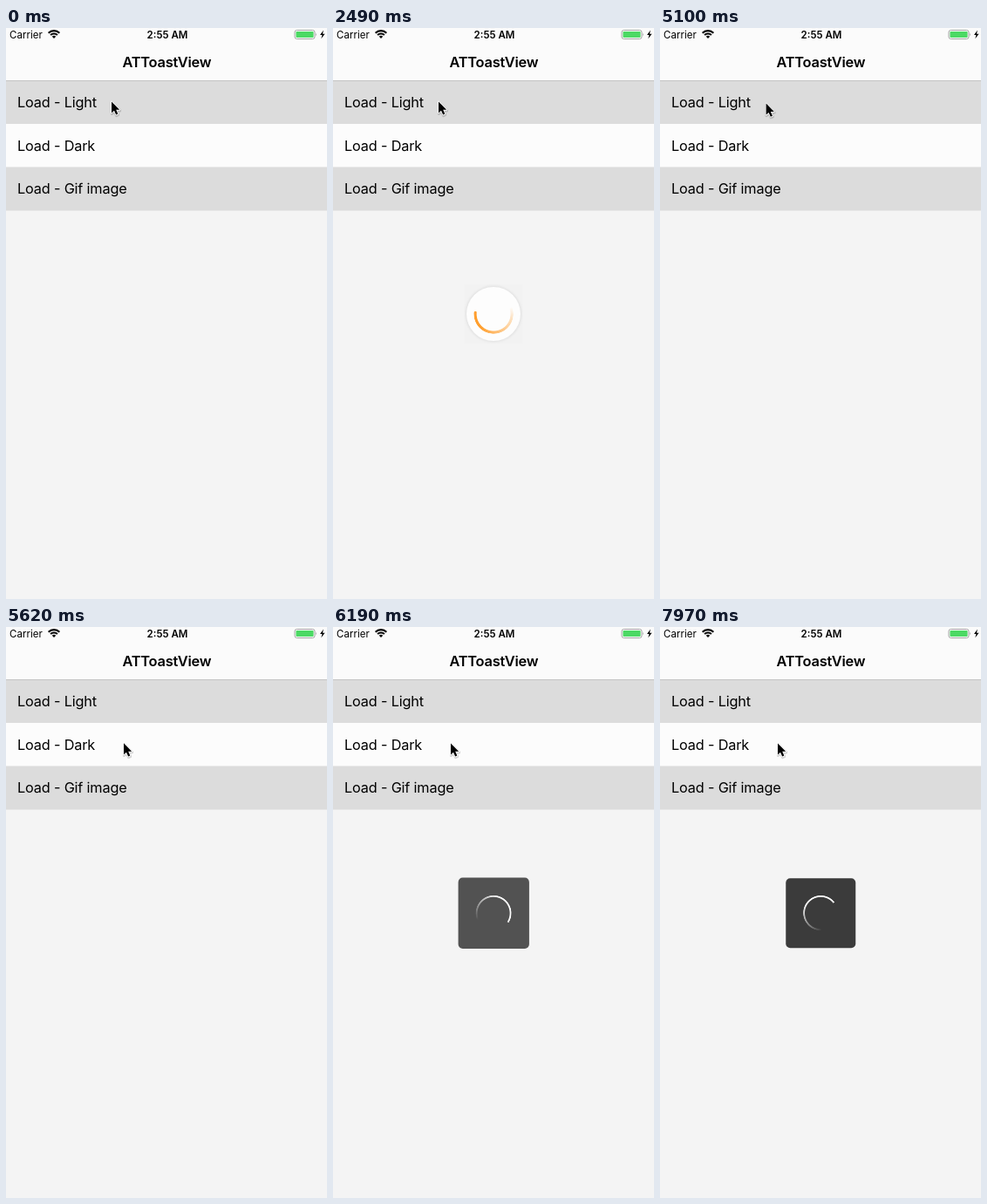
Animation, 368 px wide and 655 px high, one loop 8000 ms. Source, as an HTML page:

```html
<!DOCTYPE html>
<html lang="en">
<head>
<meta charset="utf-8">
<title>Toast demo</title>
<style>
  html, body { margin: 0; width: 100%; height: 100%; overflow: hidden; background: #f4f4f4; }
  svg { position: absolute; left: 0; top: 0; }
  text { font-family: Inter, "Liberation Sans", sans-serif; fill: #000; }
  .row { font-size: 16.3px; letter-spacing: -.18px; }
  .title { font-size: 16.4px; font-weight: 600; letter-spacing: -.25px; }
  .status { font-size: 11.5px; }

  .toast { position: absolute; left: 184px; top: 328px; width: 0; height: 0; opacity: 0; }
  .toast div { position: absolute; transform: translate(-50%, -50%); }
  .halo { width: 67px; height: 67px; background: #f2f2f2; }
  .disc { width: 62px; height: 62px; border-radius: 50%; background: #fdfdfd;
          box-shadow: 0 0 3px 1px rgba(0, 0, 0, .08); }
  .plate { width: 79.5px; height: 79.5px; border-radius: 5px; background: #3b3b3b; }

  .toast .ring {
    --band: radial-gradient(circle closest-side,
      transparent calc(100% - var(--w) - .6px), #000 calc(100% - var(--w) + .3px),
      #000 calc(100% - .8px), transparent 100%);
    width: calc(2 * var(--r)); height: calc(2 * var(--r));
    border-radius: 50%;
    -webkit-mask: var(--band); mask: var(--band);
  }
  .ring::after {
    content: ""; position: absolute; left: calc(100% - var(--w) - .3px); top: calc(50% - var(--w) / 2);
    width: var(--w); height: var(--w); border-radius: 50%; background: var(--ink);
  }
  .light .ring {
    --r: 23.1px; --w: 3.4px; --ink: #ff9f2f;
    background: conic-gradient(from 90deg, transparent 155deg, rgba(255, 159, 47, .25) 185deg, #ff9f2f 310deg);
  }
  .dark .ring {
    --r: 20.3px; --w: 2.1px; --ink: #fff;
    background: conic-gradient(from 90deg, transparent 125deg, #fff 250deg);
  }
</style>
</head>
<body>
<svg width="368" height="655" viewBox="0 0 368 655">
  <rect width="368" height="655" fill="#f4f4f4"/>
  <rect width="368" height="60" fill="#fbfbfb"/>
  <rect y="60" width="368" height="1" fill="#c4c4c4"/>
  <rect y="61" width="368" height="49" fill="#dcdcdc"/>
  <rect y="110" width="368" height="50" fill="#fcfcfc"/>
  <rect y="159.5" width="368" height="50" fill="#dcdcdc"/>

  <text class="status" x="4.1" y="11.6">Carrier</text>
  <text class="status" x="185" y="11.6" text-anchor="middle" font-weight="600">2:55 AM</text>
  <g transform="translate(55 12)" fill="none" stroke="#000" stroke-width="2.1">
    <path d="M-6.3 -6.3A8.9 8.9 0 0 1 6.3 -6.3"/>
    <path d="M-3.9 -3.9A5.5 5.5 0 0 1 3.9 -3.9"/>
    <path d="M0 0L-2.2 -2.2A3.1 3.1 0 0 1 2.2 -2.2Z" fill="#000" stroke="none"/>
  </g>
  <rect x="331" y="2.5" width="23" height="10" rx="2.4" fill="#fff" stroke="#a3a3a3"/>
  <rect x="332.4" y="3.9" width="20.2" height="7.2" rx="1" fill="#4cd964"/>
  <path d="M355.2 5.6Q356.8 7.5 355.2 9.4Z" fill="#a3a3a3"/>
  <path d="M364 2.6L360 8H362.5L361.3 12.3L365.6 6.7H363Z"/>

  <text class="title" x="184.4" y="44.8" text-anchor="middle">ATToastView</text>
  <text class="row" x="13" y="91">Load - Light</text>
  <text class="row" x="13" y="141">Load - Dark</text>
  <text class="row" x="13" y="190">Load - Gif image</text>

  <g id="cursor">
    <path d="M0 0V13L3 10.3L5.2 15.1L7.3 14.2L5.2 9.4H9.2Z" transform="translate(.4 1.1)"
      fill="none" stroke="#000" stroke-opacity=".16" stroke-width="3" stroke-linejoin="round"/>
    <path d="M0 0V13L3 10.3L5.2 15.1L7.3 14.2L5.2 9.4H9.2Z"
      stroke="#fff" stroke-width="1.7" stroke-linejoin="round" paint-order="stroke"/>
  </g>
</svg>

<div class="toast light" id="light"><div class="halo"></div><div class="disc"></div><div class="ring"></div></div>
<div class="toast dark" id="dark"><div class="plate"></div><div class="ring"></div></div>

<script>
  const LOOP = 8000;
  const byId = id => document.getElementById(id);
  const ramp = (t, from, to) => Math.min(1, Math.max(0, (t - from) / (to - from)));
  const mix = (a, b, p) => a + (b - a) * p;
  const easeInOut = p => p < .5 ? 4 * p ** 3 : 1 - 4 * (1 - p) ** 3;

  // Shrinks into place while fading in, then shrinks further while fading out.
  function drawToast(el, shown, hidden, angle) {
    el.style.opacity = shown * (1 - hidden);
    el.style.transform = `scale(${mix(1.13, 1, shown) * mix(1, .88, hidden)})`;
    el.querySelector('.ring').style.transform = `translate(-50%, -50%) rotate(${angle}deg)`;
  }

  function draw(t) {
    const move = easeInOut(ramp(t, 4940, 5660));
    byId('cursor').setAttribute('transform',
      `translate(${mix(121, 135, move)} ${mix(84.4, 133.4, move)})`);
    drawToast(byId('light'), ramp(t, 1320, 1590), ramp(t, 4600, 4770), 183 + .189 * (t - 2490));
    drawToast(byId('dark'), ramp(t, 5955, 6225), 0, -24 + .365 * (t - 6040));
  }

  const start = performance.now();
  function tick() {
    draw((performance.now() - start) % LOOP);
    requestAnimationFrame(tick);
  }
  tick();
</script>
</body>
</html>
```
